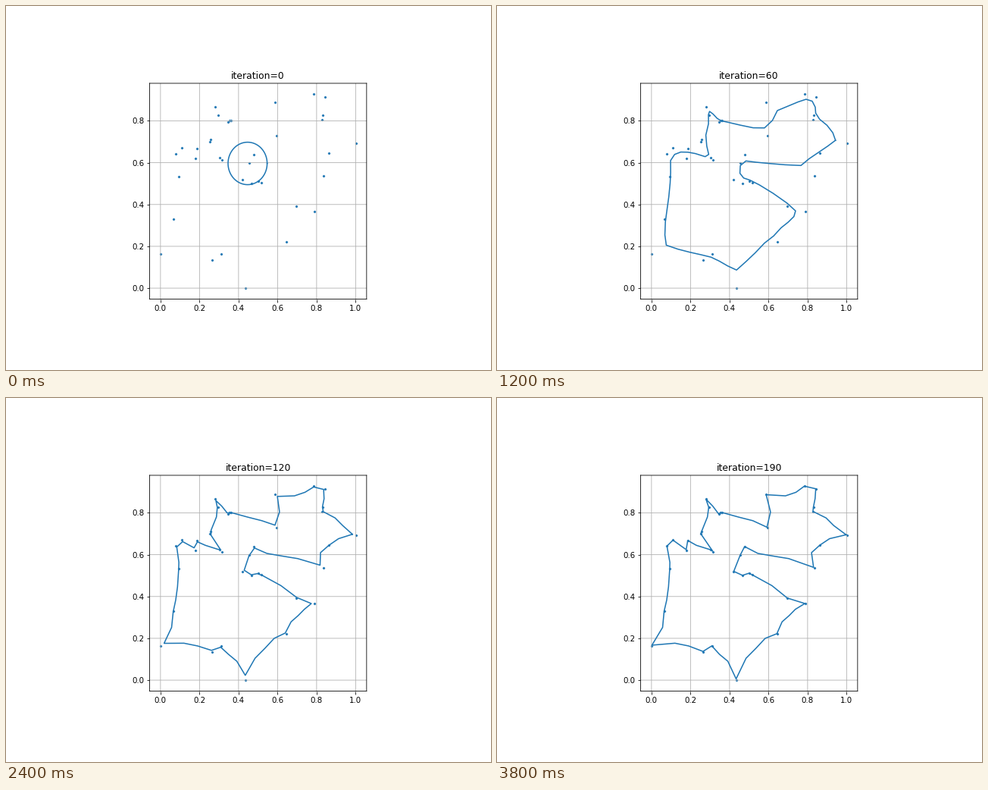
Write a matplotlib script that moves like this. It is 640x480 px and loops after 4000 ms.

```python
import numpy as np
import matplotlib.pyplot as plt
from matplotlib.animation import FuncAnimation

W, H, DPI = 640, 480, 72
SIDE = 0.77 * H                      # square panel holding the plot
LEFT = (1.025 * W - SIDE) / 2 + 0.125 * SIDE
TOP = 0.12 * H + 0.12 * SIDE
WIDTH, HEIGHT = 0.775 * SIDE, 0.77 * SIDE
XLIM = (-0.0562, 1.0562)
YLIM = (-0.0525, 0.9795)
PT = SIDE / (5 * DPI)                # the panel is five inches wide
STEP, FRAMES = 10, 20
BLUE = "#1f77b4"

# Cities in tour order: x, y on the stage, free net points before the next city
cities = np.array([
    (461.5, 180.5, 2), (416.5, 149.5, 0), (417.5, 144, 1), (421, 119.5, 0),
    (405.5, 116, 2), (354.5, 127, 1), (356.5, 171, 2), (297, 151, 0),
    (295, 151, 0), (292.5, 153, 1), (275.5, 133, 0), (279.5, 144, 1),
    (270, 176, 0), (268.5, 178.5, 0), (285, 202.5, 0), (281.5, 200, 1),
    (251.5, 187.5, 0), (250, 200.5, 0), (232, 187, 0), (224, 195, 1),
    (228, 224.5, 2), (220.5, 281, 1), (203.5, 326.5, 2), (272, 334.5, 0),
    (283.5, 326.5, 2), (315.5, 371.5, 3), (369.5, 311, 3), (407, 271, 0),
    (383, 264, 1), (336.5, 233, 0), (332.5, 231, 0), (324, 234, 0),
    (312, 229, 0), (321, 207, 0), (326.5, 195.5, 3), (418.5, 224, 1),
    (426, 194, 1)])
spots = cities[:, :2]
ends = np.cumsum(cities[:, 2].astype(int) + 1)
slots = np.r_[0, ends[:-1]]          # place of each city along the net
N = ends[-1]


def smooth(knots):
    """Closed curve with one Catmull-Rom point added between knots."""
    k = np.asarray(knots, float)
    mid = (9 * (k + np.roll(k, -1, 0)) - np.roll(k, 1, 0) - np.roll(k, -2, 0)) / 16
    return np.stack([k, mid], axis=1).reshape(-1, 2)


def neighbours(net):
    return (np.roll(net, 1, 0) + np.roll(net, -1, 0)) / 2


angle = 2 * np.pi * np.arange(N) / N
circle = np.column_stack([318.8 + 25.8 * np.cos(angle),
                          207.6 - 28 * np.sin(angle)])

blob = smooth(smooth([
    (413, 184), (409.5, 165.5), (390, 164), (338, 162.5), (295, 154),
    (282, 164), (264, 181.5), (252.5, 199), (248, 234), (260.5, 289),
    (291, 326.5), (314, 335), (341, 314), (342, 269), (338.5, 237.5),
    (360, 226), (404, 210)]))

rough = smooth(smooth([
    (441, 175), (425, 139.5), (402, 130), (354, 158), (297, 151),
    (281, 141), (279.5, 197), (238, 192), (230, 240), (226.5, 301),
    (270, 325), (316, 334.5), (362, 295), (390, 268.5), (338, 225),
    (326, 209), (390, 203)]))

# Free points come to rest between the straight leg and the rough net
legs = np.column_stack([np.interp(np.arange(N), np.r_[slots, N], np.r_[c, c[0]])
                        for c in spots.T])
tour = 0.55 * legs + 0.45 * rough
tour[slots] = spots


def settle(it):
    """Net points at cities close in on them exponentially."""
    net = tour.copy()
    pull = 0.57 * np.exp((80 - it) / 42)
    net[slots] += pull * (neighbours(tour)[slots] - spots)
    return net


def mix(a, b, t):
    return a + (b - a) * t


def net_at(it):
    if it < 20:
        return mix(circle, blob, it / 20)
    if it < 40:
        return mix(blob, rough, (it - 20) / 20)
    if it < 80:
        return mix(rough, settle(80), 1 - (1 - (it - 40) / 40) ** 1.4)
    return settle(it)


def to_data(points):
    x, y = np.transpose(points)
    return (XLIM[0] + (x - LEFT) / WIDTH * (XLIM[1] - XLIM[0]),
            YLIM[1] - (y - TOP) / HEIGHT * (YLIM[1] - YLIM[0]))


plt.rcParams.update({
    "font.family": "DejaVu Sans", "font.size": 10 * PT, "path.snap": False,
    "axes.linewidth": 0.8 * PT, "grid.linewidth": 0.8 * PT,
    "lines.linewidth": 1.5 * PT})
fig = plt.figure(figsize=(W / DPI, H / DPI), dpi=DPI)
ax = fig.add_axes([LEFT / W, 1 - (TOP + HEIGHT) / H, WIDTH / W, HEIGHT / H])
ax.scatter(*to_data(spots), s=10 * PT ** 2, marker="+", color=BLUE,
           linewidths=1.5 * PT)
line, = ax.plot([], [], color=BLUE)
ax.set(xlim=XLIM, ylim=YLIM, xticks=np.arange(6) / 5, yticks=np.arange(5) / 5)
ax.grid(True)
title = ax.set_title("iteration=0")


def update(i):
    it = i * STEP
    net = net_at(it)
    line.set_data(*to_data(np.vstack([net, net[:1]])))
    title.set_text(f"iteration={it}")
    return line, title


anim = FuncAnimation(fig, update, frames=FRAMES, init_func=lambda: update(0),
                     interval=200, repeat=True, repeat_delay=0)
plt.show()
```
